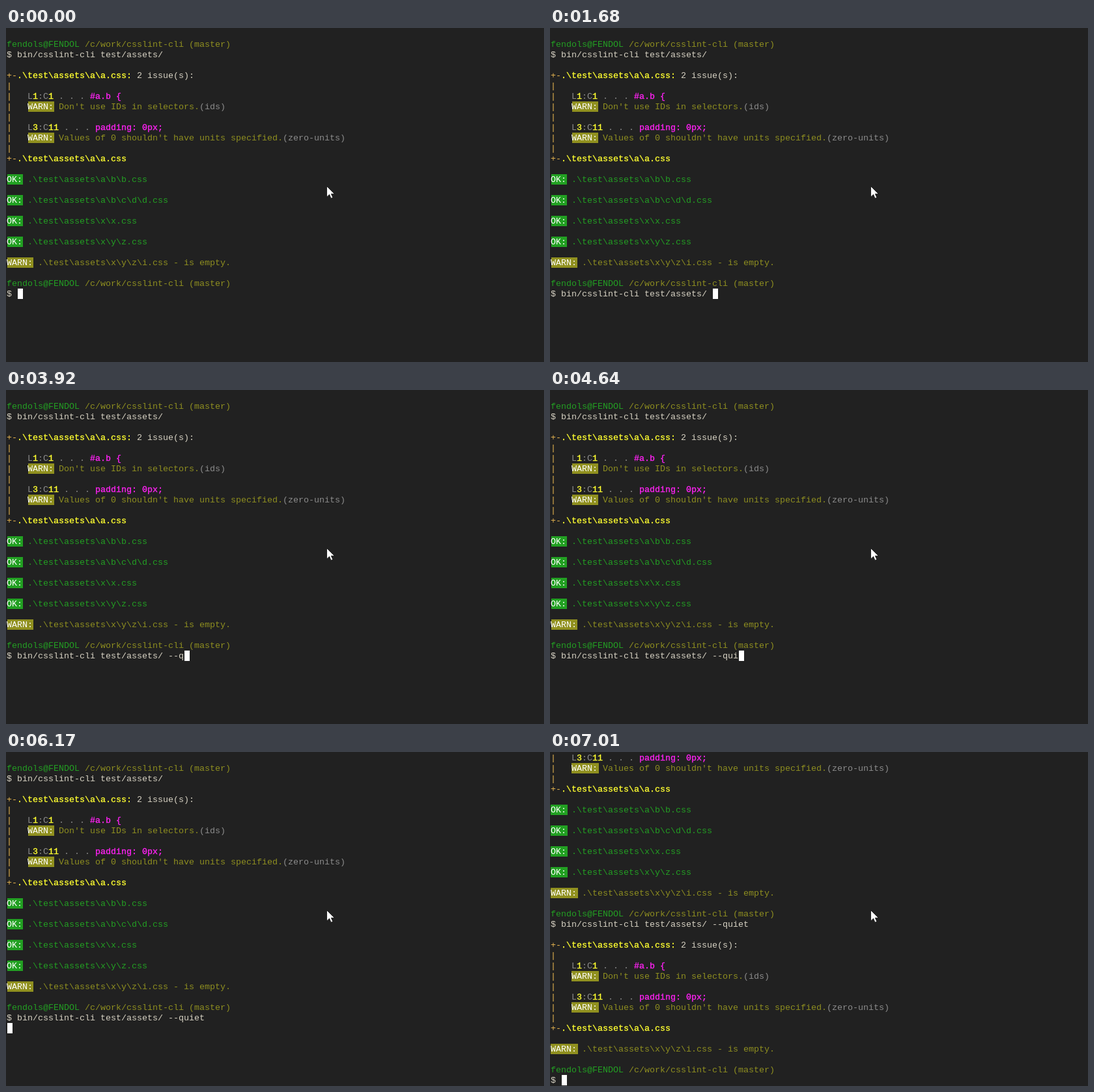
Recreate the animation shown at these times as an HTML page. Size 826 by 514 pixels, loop 8 s.

```html
<!DOCTYPE html>
<html lang="en">
<head>
<meta charset="utf-8">
<title>Terminal</title>
<style>
html, body { margin: 0; width: 100%; height: 100%; overflow: hidden; background: #212121; }
pre {
  position: absolute; z-index: 0; left: 1px; top: 2px; margin: 0;
  font: 13.333px/16px "Liberation Mono", "Courier New", monospace;
  color: #d8d3c4;
}
svg { position: absolute; z-index: 1; left: 492px; top: 243px; overflow: visible; }
.green { color: #239f23; }
.olive { color: #8f8f20; }
.grey { color: #8c8c8c; }
.amber { color: #e8b650; }
.yellow { color: #ffff30; }
.pink { color: #ff22f4; }
.yellow, .pink { -webkit-text-stroke: .35px; }

/* The cell behind a block sits 1px right of and above its glyphs. */
.block { position: relative; display: inline-block; height: 16px; vertical-align: top; color: #fff; }
.block::before {
  content: ""; position: absolute; z-index: -1; inset: -1px -1px 1px 1px;
  background: var(--fill);
}
.ok { --fill: #22a022; }
.warn { --fill: #90901f; }
.cursor { --fill: #fff; width: 8px; }
.scrolled .ok::before, .scrolled .warn::before { left: 0; right: -2px; }
</style>
</head>
<body>
<pre id="screen"></pre>
<svg width="13" height="20"><path d="M.5 .5V17L4.5 13.2L7 19.2L9.8 18L7.3 12.3H12.3Z" fill="#fff" stroke="#111" stroke-width=".8"/></svg>
<script>
const LOOP = 8000, ROWS = 32;
const screen = document.getElementById('screen');
const span = (style, text = '') => `<span class="${style}">${text}</span>`;

const command = 'bin/csslint-cli test/assets/';
const option = ' --quiet';
const optionTimes = [1680, 2370, 2520, 3920, 4490, 4640, 5480, 5890];
const TYPE = 840, ENTER = 6170, OUTPUT = 6600, DONE = 7010;

const cursor = span('block cursor');
const warn = span('block warn', 'WARN:');
const ok = span('block ok', 'OK:');
const prompt = span('green', 'fendols@FENDOL') + ' ' + span('olive', '/c/work/csslint-cli (master)');
const bar = span('amber', '|');
const edge = span('amber', '+-') + span('yellow', String.raw`.\test\assets\a\a.css`);

const place = (line, col, code) => bar + '   ' + span('grey', 'L') + span('yellow', line) +
  span('grey', ':C') + span('yellow', col) + span('grey', ' . . . ') + span('pink', code);
const warning = (text, rule) => bar + '   ' + warn + ' ' + span('olive', text) + span('grey', `(${rule})`);
const passed = path => ok + span('green', String.raw` .\test\assets` + path);

const issues = [
  edge + span('yellow', ':') + ' 2 issue(s):',
  bar,
  place(1, 1, '#a.b {'),
  warning("Don't use IDs in selectors.", 'ids'),
  bar,
  place(3, 11, 'padding: 0px;'),
  warning("Values of 0 shouldn't have units specified.", 'zero-units'),
  bar,
  edge,
  ''
];
const empty = warn + span('olive', String.raw` .\test\assets\x\y\z\i.css - is empty.`);
const passes = [String.raw`\a\b\b.css`, String.raw`\a\b\c\d\d.css`, String.raw`\x\x.css`, String.raw`\x\y\z.css`]
  .flatMap(path => [passed(path), '']);
const history = ['', prompt, '$ ' + command, '', ...issues, ...passes, empty, '', prompt];

function linesAt(t) {
  const typed = t < TYPE ? '' : command + option.slice(0, optionTimes.filter(at => at <= t).length);
  const lines = [...history, '$ ' + typed];
  if (t < ENTER) lines[lines.length - 1] += cursor;
  else if (t < OUTPUT) lines.push(cursor);
  else {
    lines.push('', ...issues, empty);
    if (t < DONE) lines.push(cursor);
    else lines.push('', prompt, '$ ' + cursor);
  }
  return lines;
}

let shown = '';
const start = performance.now();
function draw() {
  const t = (performance.now() - start) % LOOP;
  const html = linesAt(t).slice(-ROWS).join('\n');
  if (html !== shown) {
    screen.innerHTML = shown = html;
    screen.className = t < OUTPUT ? '' : 'scrolled';
  }
  requestAnimationFrame(draw);
}
draw();
</script>
</body>
</html>
```
